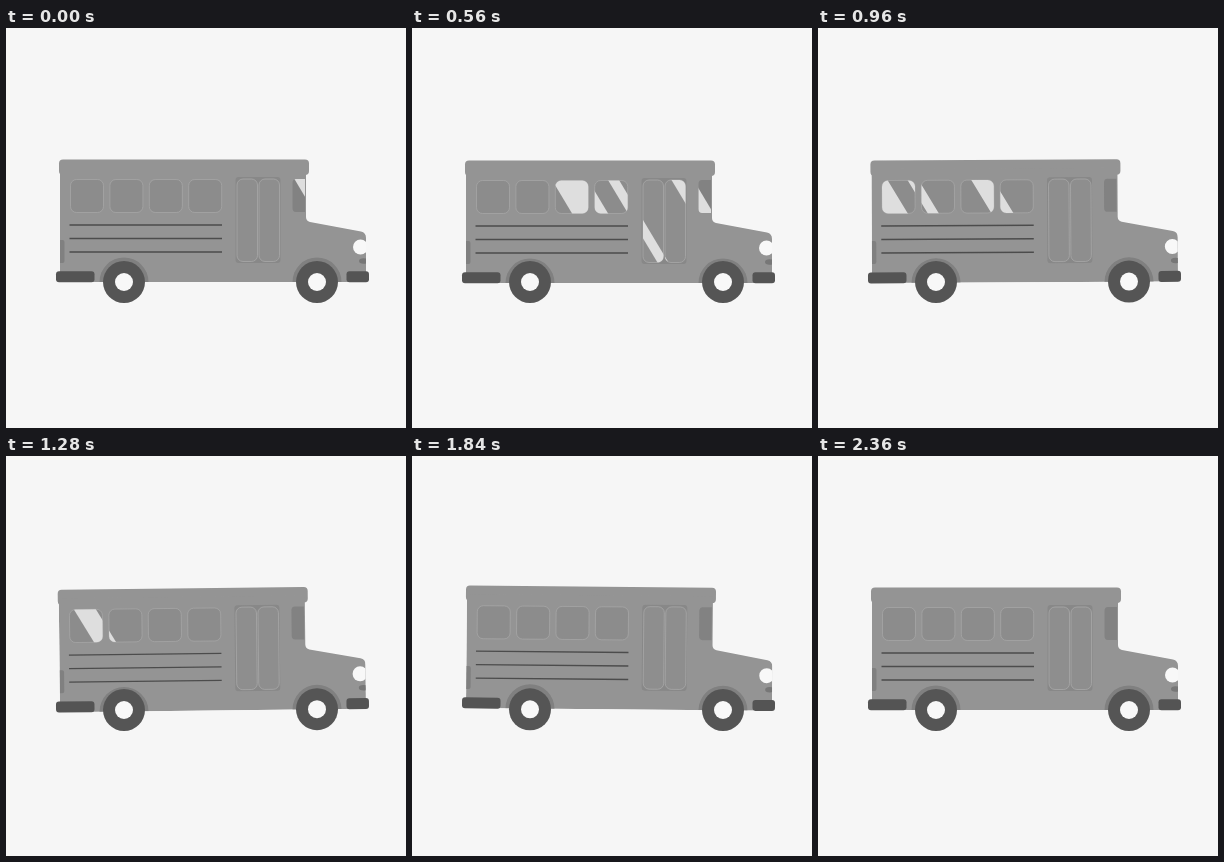
Recreate the animation shown at these times as an HTML page. Size 400 px wide and 400 px high, loop 2400 ms.

```html
<!DOCTYPE html>
<html lang="en">
<head>
<meta charset="utf-8">
<title>Bus</title>
<style>
  html, body { margin: 0; width: 100%; height: 100%; overflow: hidden; background: #f6f6f6; }
  svg { display: block; width: 100vw; height: 100vh; }
</style>
</head>
<body>
<svg viewBox="0 0 400 400" xmlns="http://www.w3.org/2000/svg">
  <defs>
    <clipPath id="glass"></clipPath>
    <clipPath id="shell">
      <path d="M54 140H300V189Q300 193 304 194L355 203.500Q360 204.500 360 210V254H54Z"/>
    </clipPath>
  </defs>
  <g id="bus">
    <rect x="53" y="131.500" width="250" height="15.500" rx="4" fill="#949494"/>
    <g clip-path="url(#shell)">
      <rect x="50" y="136" width="314" height="120" fill="#949494"/>
      <rect x="51" y="212" width="7.500" height="23" rx="2" fill="#808080"/>
      <circle cx="354.500" cy="219" r="7.500" fill="#f8f8f8"/>
      <ellipse cx="357.500" cy="233" rx="4.500" ry="2.800" fill="#777"/>
      <circle cx="118" cy="254" r="24.500" fill="#808080"/>
      <circle cx="311" cy="254" r="24.500" fill="#808080"/>
    </g>
    <rect x="229.500" y="149" width="45" height="86" rx="3" fill="#888"/>
    <g id="panes"></g>
    <g clip-path="url(#glass)"><g id="glare" fill="#dedede"></g></g>
    <path d="M63.500 197H216M63.500 210.500H216M63.500 224H216" stroke="#4c4c4c" stroke-width="1.400"/>
    <rect x="50" y="243.300" width="38.500" height="11" rx="3" fill="#545454"/>
    <rect x="340.500" y="243.300" width="22.500" height="11" rx="3" fill="#545454"/>
  </g>
  <g id="rear"></g>
  <g id="front"></g>
</svg>
<script>
const $ = id => document.getElementById(id);
const LOOP = 2400, STEP = 40;

function add(parent, tag, attrs) {
  const el = document.createElementNS("http://www.w3.org/2000/svg", tag);
  for (const k in attrs) el.setAttribute(k, attrs[k]);
  parent.appendChild(el);
}

function pane(x, y, width, height, rx, fill, stroke) {
  add($("panes"), "rect", { x, y, width, height, rx, fill, stroke, "stroke-width": 0.7 });
  add($("glass"), "rect", { x, y, width, height, rx });
}

for (let i = 0; i < 4; i++) pane(64.5 + i * 39.4, 151.5, 33, 33, 6, "#8c8c8c", "#a9a9a9");
for (const x of [231, 253]) pane(x, 151, 20.5, 82.500, 6, "#8e8e8e", "#adadad");
const shield = "M290 151H299V184H290Q286.500 184 286.500 180V155Q286.500 151 290 151Z";
add($("panes"), "path", { d: shield, fill: "#828282" });
add($("glass"), "path", { d: shield });

// Slanted light bands: offset from the leading edge, width at the window top
for (const [x, w] of [[0, 36], [56, 11], [119.5, 22]]) {
  add($("glare"), "path", { d: `M${x} 152l-12 -20h${w}l72 120h${-w}z` });
}

for (const [id, x] of [["rear", 118], ["front", 311]]) {
  add($(id), "circle", { cx: x, cy: 254, r: 21, fill: "#555" });
  add($(id), "circle", { cx: x, cy: 254, r: 9, fill: "#f8f8f8" });
}

// time, tilt in degrees, vertical shift
const keys = [
  [0, 0, 0], [560, 0, 1], [960, -0.3, 0.3], [1120, -1.2, -2],
  [1280, -0.65, 0.5], [1400, 0, 0], [1520, 0.62, -1.1], [1690, 1.5, -4],
  [1840, 0.5, -0.6], [2000, 0, 0.6], [2200, 0, 0.3], [2320, 0, 0], [2400, 0, 0]
];

function slope(i, c) {
  const a = keys[i - 1], k = keys[i], b = keys[i + 1];
  if (!a || !b || (k[c] - a[c]) * (b[c] - k[c]) <= 0) return 0;
  return (b[c] - a[c]) / (b[0] - a[0]);
}

function sample(t, c) {
  let i = 0;
  while (t >= keys[i + 1][0]) i++;
  const a = keys[i], b = keys[i + 1], d = b[0] - a[0], u = (t - a[0]) / d, v = 1 - u;
  return v * v * (1 + 2 * u) * a[c] + u * u * (3 - 2 * u) * b[c]
    + u * v * d * (v * slope(i, c) - u * slope(i + 1, c));
}

function draw(t) {
  const tilt = sample(t, 1), dy = sample(t, 2);
  $("bus").setAttribute("transform", `translate(0 ${dy}) rotate(${tilt} 206 250)`);
  $("rear").setAttribute("transform", `translate(0 ${-1.3 * Math.max(tilt, 0)})`);
  $("front").setAttribute("transform", `translate(0 ${1.3 * Math.min(tilt, 0)})`);
  $("glare").setAttribute("transform", `translate(${289 - 0.265 * t} 0)`);
}

const start = performance.now();
function tick() {
  const t = (performance.now() - start) % LOOP;
  draw(Math.floor(t / STEP) * STEP);
  requestAnimationFrame(tick);
}
tick();
</script>
</body>
</html>
```
